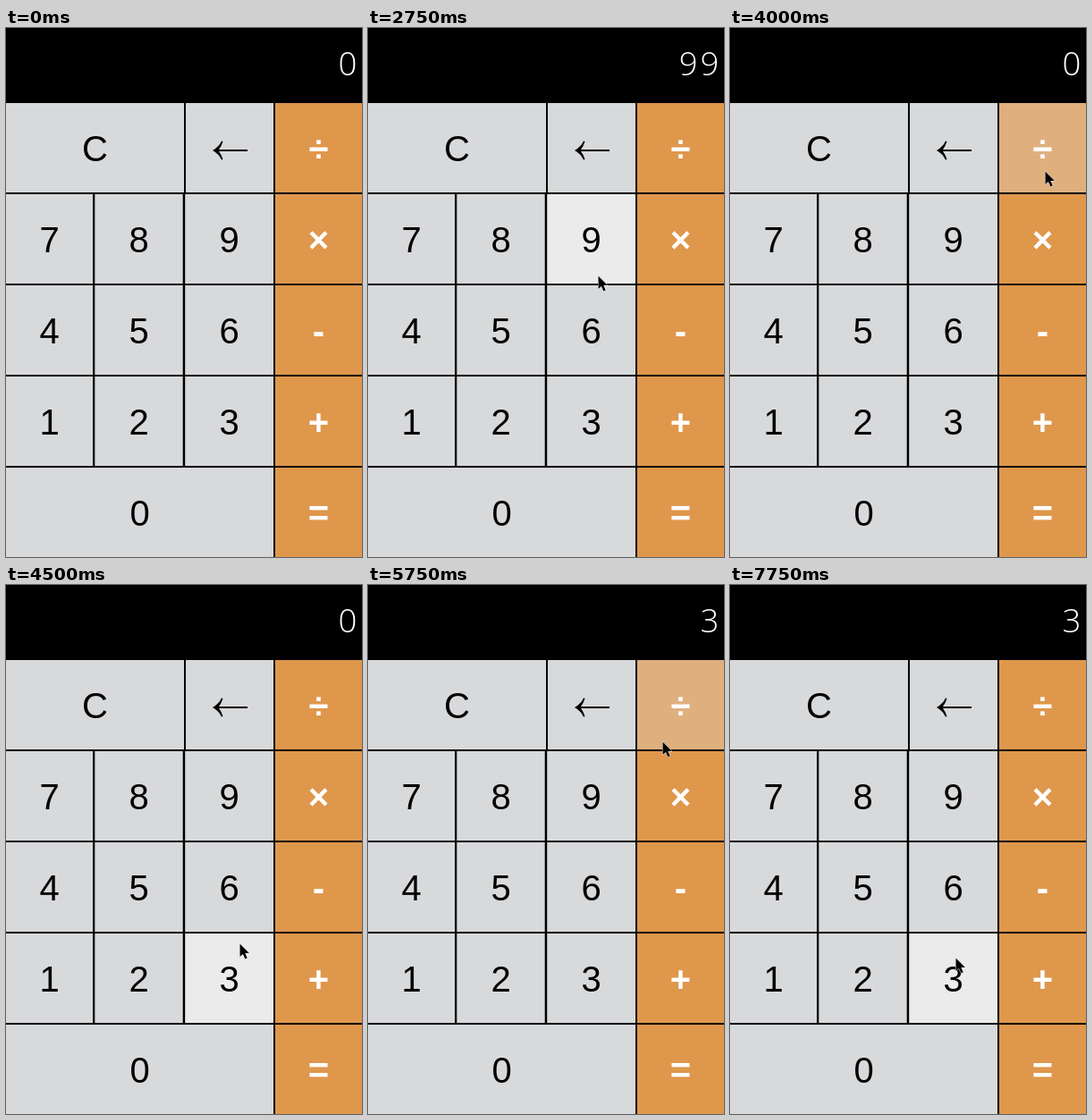
Animation, 398 px wide and 592 px high, one loop 8000 ms. Source, as an HTML page:

```html
<!DOCTYPE html>
<html lang="en">
<head>
<meta charset="utf-8">
<title>Calculator</title>
<style>
html, body { margin: 0; width: 100%; height: 100%; overflow: hidden; background: #000; }
svg { display: block; width: 398px; height: 592px; }
.key rect { fill: #d8d9db; }
.key.hover rect { fill: #ebebeb; }
.op rect { fill: #df974c; }
.op.hover rect { fill: #dfb07e; }
.key text { font: 40px "Liberation Sans", Arial, sans-serif; text-anchor: middle; }
.op text { font-weight: bold; fill: #fff; }
#display { font: 300 36.5px "Open Sans", Lato, sans-serif; letter-spacing: 3.1px; text-anchor: end; fill: #fff; }
</style>
</head>
<body>
<svg viewBox="0 0 398 592">
  <rect width="398" height="592"/>
  <text id="display" x="395.5" y="53">0</text>
  <g id="keys"></g>
  <path id="cursor" d="M0 0V14.6L3.4 11.5L5.8 17L8.2 16L5.9 10.6H10.4Z" stroke="#fff" stroke-width="1" paint-order="stroke"/>
</svg>
<script>
const NS = 'http://www.w3.org/2000/svg';
const $ = id => document.getElementById(id);
const LOOP = 8000, HOVER_FROM = 2750;
const keys = [];

function add(parent, tag, attrs) {
  const el = document.createElementNS(NS, tag);
  for (const name in attrs) el.setAttribute(name, attrs[name]);
  parent.append(el);
  return el;
}

function addKey(label, left, right, row, kind = '') {
  const y = 84 + row * 102;
  const el = add($('keys'), 'g', { class: 'key ' + kind });
  add(el, 'rect', { x: left, y, width: right - left, height: 100 });
  if (label === '←') {
    add(el, 'path', {
      d: 'M231 137Q238 133 241 126.5L242.5 127Q240.5 133 238 136H270V138H238Q240.5 141 242.5 147L241 147.5Q238 141 231 137Z'
    });
  } else {
    add(el, 'text', { x: (left + right) / 2, y: y + 64.5 }).textContent = label;
  }
  keys.push({ el, left, right, top: y, bottom: y + 100 });
}

const cols = [[0, 97], [99.3, 197.7], [200.2, 299]];
addKey('C', 0, 199, 0);
addKey('←', 201, 299, 0);
['789', '456', '123'].forEach((digits, r) =>
  [...digits].forEach((d, c) => addKey(d, ...cols[c], r + 1)));
addKey('0', 0, 299, 4);
[...'÷×-+='].forEach((sign, r) => addKey(sign, 301, 398, r, 'op'));

// start ms, pointer x, pointer y, display
const steps = [
  [0, 420, 365, '0'],
  [500, 388, 373, '0'],
  [750, 345, 390, '0'],
  [1000, 300, 412, '0'],
  [1250, 262, 428, '0'],
  [1500, 253, 431, '0'],
  [1750, 252, 432, '0'],
  [2000, 256, 350, '0'],
  [2250, 257, 277, '0'],
  [2750, 257, 277, '99'],
  [3500, 290, 228, '99'],
  [3750, 352, 160, '99'],
  [4000, 352, 160, '0'],
  [4250, 312, 275, '0'],
  [4500, 261, 401, '0'],
  [4750, 252, 426, '0'],
  [5250, 252, 426, '3'],
  [5500, 285, 300, '3'],
  [5750, 329, 175, '3'],
  [6000, 338, 158, '3'],
  [6250, 338, 158, '0'],
  [6750, 330, 190, '0'],
  [7000, 290, 300, '0'],
  [7250, 258, 392, '0'],
  [7500, 252, 417, '0'],
  [7750, 252, 417, '3']
];

let shown;
function draw(now) {
  const t = now % LOOP;
  const step = steps.findLast(s => s[0] <= t);
  if (step !== shown) {
    shown = step;
    const [start, x, y, value] = step;
    $('display').textContent = value;
    $('cursor').setAttribute('transform', `translate(${x + 0.5} ${y + 0.5})`);
    for (const k of keys) {
      const inside = x >= k.left && x < k.right && y >= k.top && y < k.bottom;
      k.el.classList.toggle('hover', start >= HOVER_FROM && inside);
    }
  }
}

const begin = performance.now();
function tick() {
  draw(performance.now() - begin);
  requestAnimationFrame(tick);
}
tick();
</script>
</body>
</html>
```
